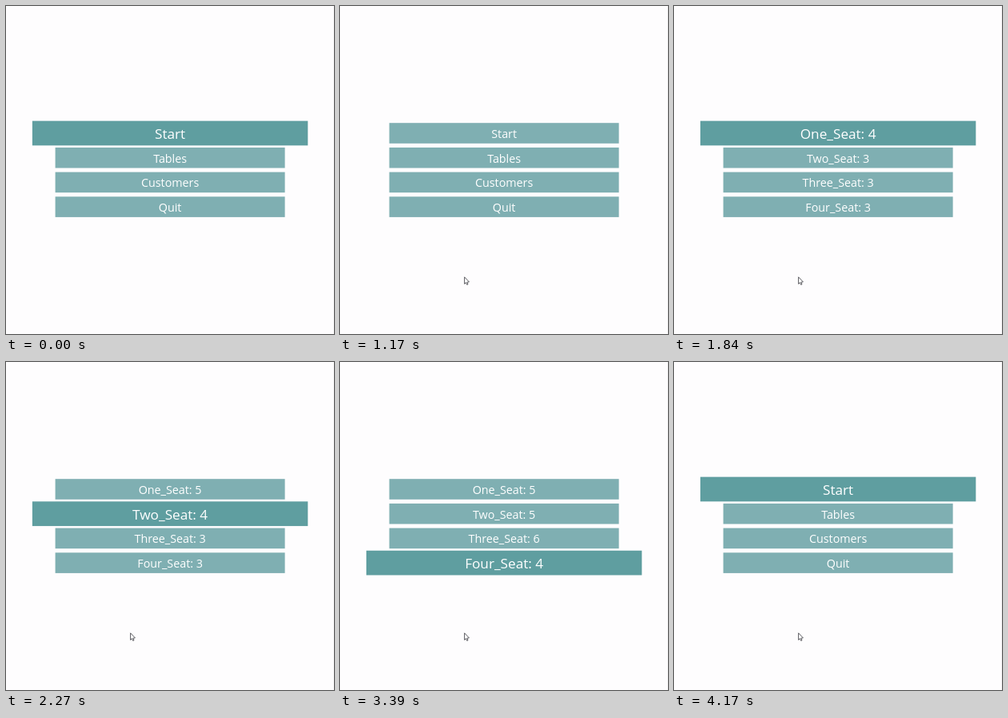
An HTML page with a canvas for the animation above (4350 ms loop, 410 by 410 pixels).

```html
<!DOCTYPE html>
<html lang="en">
<head>
<meta charset="utf-8">
<title>Sliding menu</title>
<style>
  html, body { margin: 0; width: 100%; height: 100%; overflow: hidden; background: #fefdfe; }
  canvas { display: block; width: 100vw; height: 100vh; }
</style>
</head>
<body>
<canvas id="stage" width="410" height="410"></canvas>
<script>
const ctx = document.getElementById('stage').getContext('2d');
const SIZE = 410, LOOP = 4350, TICK = 20;
const CENTER_X = 205.1, FIRST_Y = 159, PITCH = 30.7;
const BAR_W = 287, BAR_H = 25.6, FONT = 14.3, GROW = 0.2;
const IDLE = [127, 175, 178], ACTIVE = [95, 158, 160];

const MAIN = ['Start', 'Tables', 'Customers', 'Quit'];
const SEATS = ['One', 'Two', 'Three', 'Four'];

// Times at which each seat counter goes up by one, starting from 3
const PRESSES = [[1840, 1920], [2270, 2450], [2710, 2790, 2920], [3390]];

// Selection moves: time, row left, row entered (-1 for none)
const MAIN_MOVES = [[780, 0, 1], [1110, 1, -1]];
const SEAT_MOVES = [[2070, 0, 1], [2610, 1, 2], [3170, 2, 3], [3690, 3, -1]];
const MOVE_TIME = 53, LEAD = 13;

// Slides: start of the action, delay before row 0 moves, speed in px/ms
const FORWARD = { at: 1110, delay: 82, speed: 1.911 };
const BACK = { at: 3690, delay: 43, speed: 1.7 };
const STAGGER = 91.2;

const clamp = (v, lo, hi) => Math.min(hi, Math.max(lo, v));
const ticks = (t, from) => Math.floor((t - from) / TICK) * TICK;

function selection(moves, row, t) {
  let level = row === 0 ? 1 : 0;
  for (const [at, from, to] of moves) {
    if (t < at) break;
    const p = clamp((ticks(t, at) + LEAD) / MOVE_TIME, 0, 1);
    if (row === from) level = 1 - p;
    if (row === to) level = Math.pow(p, 1.8);
  }
  return level;
}

function travel(slide, row, t) {
  const run = (ticks(t, slide.at) - slide.delay) * slide.speed;
  return clamp(run - STAGGER * row, 0, SIZE);
}

function seatLabel(row, t) {
  const count = 3 + PRESSES[row].filter(at => t >= at).length;
  return SEATS[row] + '_Seat: ' + count;
}

function drawBar(label, row, dx, level) {
  const k = 1 + GROW * level;
  const w = BAR_W * k, h = BAR_H * k;
  const x = CENTER_X + dx, y = FIRST_Y + PITCH * row;
  if (x + w / 2 < 0 || x - w / 2 > SIZE) return;
  const rgb = IDLE.map((c, i) => Math.round(c + (ACTIVE[i] - c) * level));
  ctx.fillStyle = `rgb(${rgb})`;
  ctx.fillRect(x - w / 2, y - h / 2, w, h);
  ctx.fillStyle = '#fff';
  ctx.font = `${FONT * k}px "Open Sans", "Noto Sans", sans-serif`;
  ctx.fillText(label, x, y + FONT * k * 0.41);
}

function drawPointer() {
  ctx.save();
  ctx.translate(155.6, 338.8);
  ctx.beginPath();
  ctx.moveTo(0, 0);
  ctx.lineTo(0, 8.6);
  ctx.lineTo(1.9, 6.9);
  ctx.lineTo(3.1, 9.6);
  ctx.lineTo(4.4, 9);
  ctx.lineTo(3.3, 6.4);
  ctx.lineTo(5.8, 6.1);
  ctx.closePath();
  ctx.fillStyle = '#fff';
  ctx.fill();
  ctx.strokeStyle = '#4a4a50';
  ctx.lineWidth = 0.9;
  ctx.stroke();
  ctx.restore();
}

function draw(t) {
  ctx.fillStyle = '#fefdfe';
  ctx.fillRect(0, 0, SIZE, SIZE);
  ctx.fillStyle = '#f4f3f4';
  ctx.fillRect(SIZE - 1, 0, 1, SIZE);
  ctx.textAlign = 'center';
  ctx.textBaseline = 'alphabetic';

  const back = t >= BACK.at;
  for (let row = 3; row >= 0; row--) {
    const mainX = back ? travel(BACK, row, t) - SIZE : -travel(FORWARD, row, t);
    const mainLevel = back ? Number(row === 0) : selection(MAIN_MOVES, row, t);
    drawBar(MAIN[row], row, mainX, mainLevel);
    drawBar(seatLabel(row, t), row, mainX + SIZE, selection(SEAT_MOVES, row, t));
  }
  if (t >= 230) drawPointer();
}

const began = performance.now();
function frame() {
  draw((performance.now() - began) % LOOP);
  requestAnimationFrame(frame);
}
frame();
</script>
</body>
</html>
```
